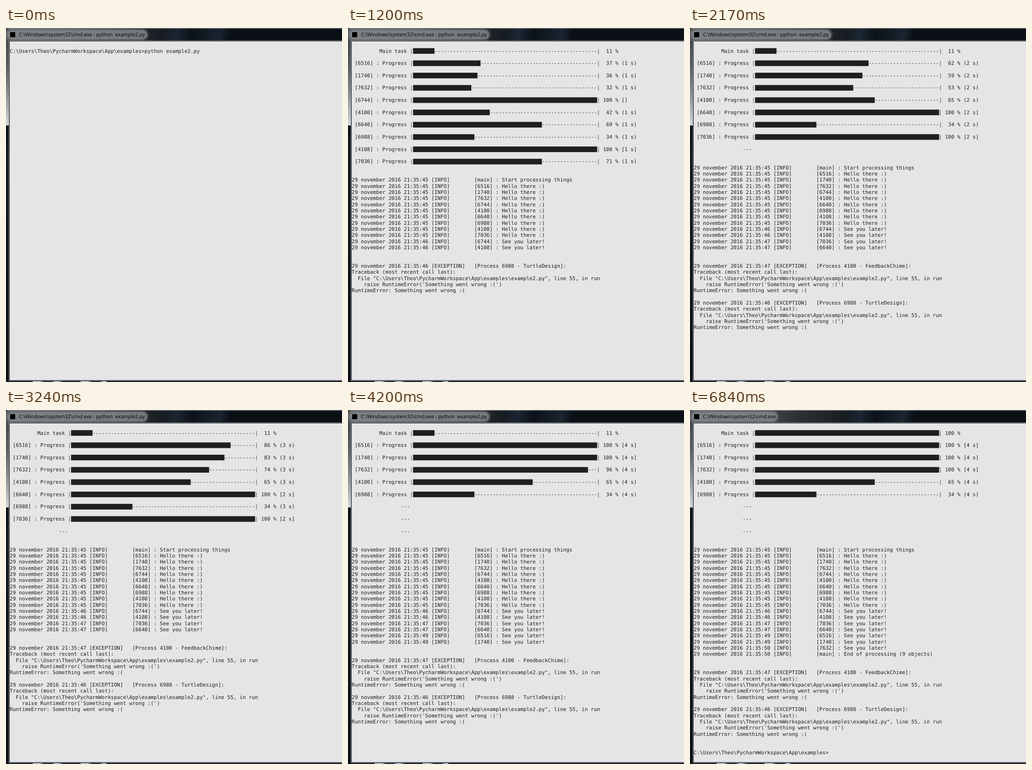
Write an HTML page that moves like this. It is 730 px wide and 768 px high and loops after 6970 ms.

```html
<!DOCTYPE html>
<html lang="en">
<head>
<meta charset="utf-8">
<title>Progress console</title>
<style>
  html, body { margin: 0; width: 100%; height: 100%; overflow: hidden; background: #0b1016; }
  #stage { position: relative; width: 730px; height: 768px; overflow: hidden; background: #0b1016; }
  #stage > * { position: absolute; margin: 0; }
  #caption {
    left: 0; top: 0; width: 730px; height: 28px; border-top-left-radius: 5px;
    background:
      linear-gradient(rgba(170, 180, 188, .6) 1px, transparent 2px),
      linear-gradient(100deg, #54585c, #464a4e 140px, #2c3035 240px, #171c22 340px,
        #1b2733 366px, #0c1218 400px, #1a2530 460px, #0a1016 482px);
  }
  #glow {
    left: 4px; top: 5px; height: 19px; border-radius: 10px;
    background: #85888a; box-shadow: 0 0 5px 2px #85888a; opacity: .85;
  }
  #icon { left: 9px; top: 9px; width: 11px; height: 11px; background: #000; }
  #title {
    left: 28px; top: 5px; white-space: pre; color: #000;
    font: 10.9px/19px "Open Sans", "Noto Sans", sans-serif; text-rendering: geometricPrecision;
  }
  #side {
    left: 0; top: 28px; width: 6px; height: 740px;
    background: linear-gradient(#44484c, #5c6063 60px, #8a8d90 115px, #d4d7d9 183px, #0c1218 184px, #131b24 250px, #0b1016);
  }
  #foot { left: 58px; top: 766px; width: 160px; height: 2px; }
  #foot {
    background: repeating-linear-gradient(90deg, #b4bcc2 0 16px, #131b26 24px 42px, #9fb0c8 48px 56px, #0d131b 66px 104px);
  }
  #frame {
    left: 6px; top: 27px; width: 740px; height: 739px; box-sizing: border-box;
    border: 1px solid #8f9497; background: #e5e5e5; box-shadow: inset 1px 1px #1c2025, inset 0 -1px #1c2025;
  }
  #bars { left: 0; top: 0; fill: #1f1f1f; }
  #text {
    left: 8px; top: 43.5px; color: #1f1f1f;
    font: 11.075px/13.3333px "DejaVu Sans Mono", monospace; text-rendering: geometricPrecision;
    font-variant-ligatures: none;
  }
  #text .l { color: #3d4a24; }
  #text .r { color: #5c2a5c; }
  #cursor { left: 301px; top: 746px; width: 7px; height: 4px; background: #1f1f1f; }
</style>
</head>
<body>
<div id="stage">
  <div id="caption"></div>
  <div id="side"></div>
  <div id="foot"></div>
  <div id="glow"></div>
  <div id="icon"></div>
  <div id="title"></div>
  <div id="frame"></div>
  <svg id="bars" width="730" height="768"></svg>
  <pre id="text"></pre>
  <div id="cursor"></div>
</div>
<script>
const LOOP = 6970, PROMPT_AT = 4470;
const CELL = 20 / 3, ROW = 40 / 3, BAR = 60;
const FOLDER = 'C:\\Users\\Theo\\PycharmWorkspace\\App\\examples';
const SHELL = 'C:\\Windows\\system32\\cmd.exe';
const REFRESHES = [150, 680, 1200, 1650, 2170, 2710, 3240, 3650, 4200, 4350];
const CURSOR_FLIPS = [5300, 5880, 6410, 6840];
const LAST = REFRESHES.length - 1;
const $ = id => document.getElementById(id);
const countUntil = (times, t) => times.filter(at => at <= t).length;

// Each task gains `rate` percent per refresh; a named one fails at `stop`.
function task(id, first, rate, stop = 100, name = '') {
  const exact = (stop - first) / rate, end = Math.ceil(exact);
  return { id, first, rate, stop, name, exact, end, clock: 45 + Math.ceil(end / 2) };
}
const tasks = [
  task(6516, 12.9, 12.25),
  task(1740, 12.35, 11.7),
  task(7632, 10.4, 10.65),
  task(6744, 60, 60),
  task(4100, 13.6, 14.4, 65, 'FeedbackChime'),
  task(6640, 22, 23.6),
  task(6988, 14.4, 14.4, 34, 'TurtleDesign'),
  task(4108, 44, 44),
  task(7036, 21.8, 24.4)
];
const byEnd = [...tasks].sort((a, b) => a.exact - b.exact);

const stamp = (clock, level) => `29 november 2016 21:35:${clock} [${level}]`.padEnd(40);
const info = (clock, who, msg) => stamp(clock, 'INFO') + `[${who}] : ${msg}`;
const failure = f => [
  '',
  stamp(f.clock, 'EXCEPTION') + `[Process ${f.id} - ${f.name}]:`,
  'Traceback (most recent call last):',
  `  File "${FOLDER}\\example2.py", line 55, in run`,
  "    raise RuntimeError('Something went wrong :(')",
  'RuntimeError: Something went wrong :('
];

// Finished rows linger for a while before they are cleared.
const cleared = (f, k) => !f.name && k > 1.5 * f.end + .5;

function elapsed(f, k) {
  const done = !f.name && k >= f.end;
  const secs = done ? Math.floor(f.end / 2) : Math.round(REFRESHES[k] / 1000);
  const label = secs ? secs + ' s' : '';
  return done ? ` [${label}]` : ` (${label})`;
}

function view(k, prompt) {
  const lines = [], bars = [];
  const addBar = (label, pct, tail) => {
    const n = Math.round(pct * BAR / 100);
    bars.push(`<rect x="141.3" y="${43.7 + lines.length * ROW}" width="${n * CELL}" height="12.2"/>`);
    lines.push(`${label.padStart(18)} <span class="l">|</span>${' '.repeat(n)}${'-'.repeat(BAR - n)}` +
      `<span class="r">|</span> ${String(Math.round(pct)).padStart(3)} %${tail}`, '');
  };
  const ended = tasks.filter(f => f.end <= k);
  const active = tasks.filter(f => !cleared(f, k));
  const slots = Math.max(active.length, tasks.length - 1);

  addBar('Main task', k === LAST ? 100 : 100 / tasks.length, '');
  for (const f of active)
    addBar(`[${f.id}] : Progress`, Math.min(f.stop, f.first + f.rate * k), elapsed(f, k));
  for (let i = active.length; i < slots; i++) lines.push(' '.repeat(16) + '---', '');

  lines.push('', info(45, 'main', 'Start processing things'));
  for (const f of tasks) lines.push(info(45, f.id, 'Hello there :)'));
  for (const f of byEnd)
    if (ended.includes(f) && !f.name) lines.push(info(f.clock, f.id, 'See you later!'));
  if (k === LAST) lines.push(info(50, 'main', 'End of processing (9 objects)'));
  lines.push('');
  for (const f of ended) if (f.name) lines.push(...failure(f));
  if (prompt) lines.push('', '', FOLDER + '&gt;');
  return { text: lines.join('\n'), bars: bars.join('') };
}

let shown;
function draw(t) {
  const k = countUntil(REFRESHES, t) - 1, prompt = t >= PROMPT_AT, key = k + ' ' + prompt;
  if (key !== shown) {
    const v = k < 0 ? { text: FOLDER + '&gt;python example2.py', bars: '' } : view(k, prompt);
    $('text').innerHTML = v.text;
    $('bars').innerHTML = v.bars;
    $('title').textContent = SHELL + (prompt ? '' : ' - python  example2.py');
    $('glow').style.width = (prompt ? 185 : 302) + 'px';
    shown = key;
  }
  $('cursor').style.visibility = countUntil(CURSOR_FLIPS, t) % 2 ? 'visible' : 'hidden';
}

const start = performance.now();
function tick() {
  draw((performance.now() - start) % LOOP);
  requestAnimationFrame(tick);
}
tick();
</script>
</body>
</html>
```
